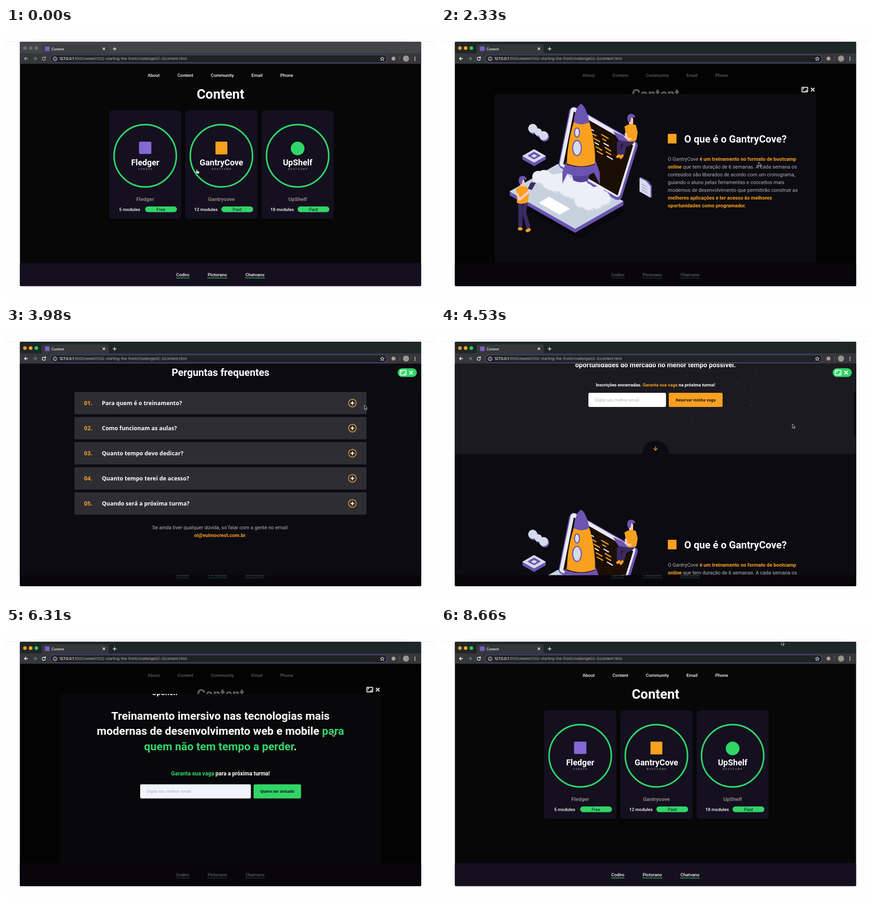
An HTML page that plays this animation: 940 by 596 pixels, repeating every 9660 ms.

```html
<!DOCTYPE html>
<html lang="pt-BR">
<head>
<meta charset="utf-8">
<title>Content</title>
<style>
  html, body { margin: 0; width: 100%; height: 100%; overflow: hidden; background: #fefefe; }
  svg { display: block; }
  text { font-family: Roboto, sans-serif; font-weight: 700; fill: #fff; white-space: pre; }
  .ui { font-family: Inter, sans-serif; font-weight: 500; }
  .noto { font-family: "Noto Sans", sans-serif; }
  .mid { text-anchor: middle; }
  .bold { font-weight: 700; }
  .med { font-weight: 500; }
  .reg { font-weight: 400; }
  .dim { fill: #8d8882; }
  .soft { fill: #b3b2bc; }
  .hint { fill: #a5adbb; font-weight: 400; }
  .dark { fill: #15101f; }
  .orange { fill: #f9a01f; }
  .green { fill: #33d56b; }
  .line { fill: none; stroke: #fff; }
</style>
</head>
<body>
<svg id="stage" width="940" height="596" viewBox="0 0 940 596"></svg>
<script>
const LOOP = 9660;
const ORANGE = '#f9a01f', GREEN = '#30d567', VIOLET = '#6c54b2', PALE = '#d5dbea', NAVY = '#3b2b63', SKIN = '#f6cdbd';

const text = (x, y, size, content, cls = '') =>
  `<text x="${x}" y="${y}" font-size="${size}" class="${cls}">${content}</text>`;
const span = (content, cls) => `<tspan class="${cls}">${content}</tspan>`;
const rect = (x, y, w, h, fill, r = 0) =>
  `<rect x="${x}" y="${y}" width="${w}" height="${h}" rx="${r}" fill="${fill}"/>`;
const circle = (x, y, r, fill) => `<circle cx="${x}" cy="${y}" r="${r}" fill="${fill}"/>`;
const shape = (d, fill) => `<path d="${d}" fill="${fill}"/>`;
const stroke = (d, color, width) =>
  `<path d="${d}" fill="none" stroke="${color}" stroke-width="${width}" stroke-linecap="round" stroke-linejoin="round"/>`;
const repeat = (n, make) => Array.from({ length: n }, (_, i) => make(i)).join('');

let seed = 7;
const random = (min, max) => min + (max - min) * ((seed = seed * 16807 % 2147483647) / 2147483647);

// Browser window

const chrome = `
  <path d="M0 29.5H30M910 29.5H940" stroke="#ececf8"/>
  ${rect(60, 24, 820, 6, '#f8f8fc', 3)}
  ${rect(30.5, 30, 879, 535.5, '#070708', 2)}
  <rect id="titleBar" x="30.5" y="30" width="879" height="26" rx="2"/>
  <path id="tab" d="M78 56V40Q78 36 82 36H221Q225 36 225 40V56Z"/>
  <g id="lights">${repeat(3, i => circle(41.5 + i * 12.5, 44, 4))}</g>
  ${rect(85.5, 40.5, 10, 10, '#7a5fc8', 1)}
  ${text(100, 48.5, 7.1, 'Content', 'ui')}
  <path d="M212 43l5 5m0-5l-5 5M234 45.7h8m-4-4v8" class="line" stroke-width="1.3"/>
  ${rect(30.5, 55.5, 879, 23, '#36373b')}
  <rect x="97" y="59" width="738" height="17" rx="8.5" fill="#202124" stroke="#574d9e" stroke-width="1.2"/>
  <path id="back" d="M48 67h-7.5m3.5-3.5L40.5 67l3.5 3.5M85.8 65a3.6 3.6 0 1 0 .6 3M86.5 62.5v3h-3" class="line" stroke-width="1.3"/>
  ${stroke('M59.5 67H67m-3.5-3.5L67 67l-3.5 3.5', '#8a8b8e', 1.2)}
  <circle cx="107.5" cy="67.5" r="4" class="line" stroke-width="1.1"/>
  <path d="M107.5 67v2.5M107.5 65v1" class="line" stroke-width="1.1"/>
  ${text(117, 70.3, 8.15, '127.0.0.1<tspan fill="#b4b6ba" class="reg">:5500/week01/02-starting-the-front/challenge02-3/content.html</tspan>', 'ui')}
  <path d="M824.5 63l1.2 3 3.2.2-2.5 2 .9 3.1-2.8-1.8-2.8 1.8.9-3.1-2.5-2 3.2-.2Z" class="line"/>
  ${circle(849, 67, 4.3, '#b39c94')}
  <path d="M862.5 61.5v11" stroke="#5c5d61"/>
  ${circle(876.5, 67, 6.7, '#9b948d')}
  ${repeat(3, i => circle(896, 64 + i * 3.3, 1.1, '#fff'))}`;

// Site below the modal

const card = (x, name, label, sub, modules, price, mark) => `<g transform="translate(${x})">
  ${rect(-79, 181, 158, 237, '#14101f', 6)}
  <circle cy="280" r="68.2" fill="none" stroke="${GREEN}" stroke-width="3.4"/>
  ${mark}
  ${text(0, 301, 18.2, name, 'mid')}
  <text x="1" y="310.5" font-size="5" letter-spacing="2.1" class="mid dim">${sub}</text>
  ${text(0, 379, 11.44, label, 'mid dim')}
  ${text(-34, 401, 9.8, modules + ' modules', 'mid med')}
  ${rect(0, 391, 69.5, 12.5, GREEN, 6.2)}
  ${text(34.5, 401, 9.8, price, 'mid reg dark')}</g>`;

const navItem = (x, name) => text(x, 106.5, 9.8, name, 'mid med');
const link = (x, w, name) => text(x, 543.7, 9.8, name, 'mid med') + rect(x - w / 2, 547, w, 1.3, '#30c460');

const site = `
  ${navItem(323.5, 'About')}${navItem(393, 'Content')}${navItem(474, 'Community')}
  ${navItem(550, 'Email')}${navItem(615, 'Phone')}
  ${text(470, 154.5, 29.3, 'Content', 'mid')}
  ${card(305, 'Fledger', 'Fledger', 'CURSOS', 5, 'Free', rect(-13.5, 249, 27, 27, '#8468d4', 2))}
  ${card(472, 'GantryCove', 'Gantrycove', 'BOOTCAMP', 12, 'Paid', rect(-13, 249, 26, 28, ORANGE))}
  ${card(639, 'UpShelf', 'UpShelf', 'BOOTCAMP', 18, 'Paid', circle(0, 264, 15, GREEN))}
  ${rect(30.5, 515, 879, 50.5, '#15101f', 2)}
  ${link(387.5, 29, 'Codiro')}${link(463, 44, 'Pictorano')}${link(545.5, 43, 'Chatvano')}`;

// Illustration: a rocket leaving a laptop

// Isometric block whose front corner is at (x, y).
function slab(x, y, w, d, h, top, side) {
  const slope = .57;
  const face = `M${x} ${y}l${w} ${-w * slope} ${-d} ${-d * slope} ${-w} ${w * slope}Z`;
  const walls = `M${x} ${y}l${w} ${-w * slope}v${h}l${-w} ${w * slope} ${-d} ${-d * slope}v${-h}Z`;
  return (h ? shape(walls, side) + stroke(walls, side, 3) : '') + shape(face, top) + stroke(face, top, 2);
}

const smoke = (n, at, light, shade) =>
  repeat(n, i => { const [x, y, r] = at(i); return circle(x + 2, y + 3, r, shade); }) +
  repeat(n, i => { const [x, y, r] = at(i); return circle(x, y, r, light); });

// Head and shirt of a figure, facing right or left.
const bust = (x, y, facing) => `<g transform="translate(${x} ${y}) scale(${facing} 1)">
  ${rect(-4, -4, 9, 16, SKIN, 4)}
  ${shape('M-8 -1Q-8 -12 1 -12 10 -11 9 -4H1L-1 6H-6Z', VIOLET)}
  ${shape('M-14 16Q0 7 11 13L15 29 12 46Q0 52 -12 47L-11 32Z', ORANGE)}</g>`;

const screen = 'M291 183L421 257 387 367 268 298Z';

const art = `<g id="art">
  ${slab(300, 456, 100, 110, 4, '#08070c', '#08070c')}
  ${slab(294, 439, 104, 142, 8, '#c8d2df', VIOLET)}
  ${stroke(screen, VIOLET, 20)}${stroke('M291 181L419 255 386 363 267 297Z', '#e8e9f3', 14)}${shape(screen, '#1b0e05')}
  ${repeat(6, row => repeat(2, col => {
    const x = 329 + row * 2.5 + col * 22, y = 222 + row * 9.5 + col * 11, w = random(6, 17);
    return `<path d="M${x} ${y}l${w} ${w * .58}" stroke="${(row + col) % 3 ? ORANGE : '#e9e8f0'}" stroke-width="2.6"/>`;
  }))}
  ${smoke(12, i => [213 + i * 13, 326 + i * 4 - 4 * Math.sin(i * 2), 13 + 8 * Math.sin(i * Math.PI / 11)], '#eceef8', '#d6dbe9')}
  ${smoke(4, i => [306 + i * 17, 378 + 7 * Math.sin(i * 1.3), 14], '#eceef8', '#d6dbe9')}
  ${slab(260, 408, 21, 44, 0, '#fff')}
  ${shape('M283 304H331L322 334Q307 342 290 334Z', '#56429a')}
  ${shape('M291 206Q308 214 325 206C334 235 338 268 338 297Q307 309 276 297C276 268 282 235 291 206', ORANGE)}
  ${shape('M307 166C299 170 292 186 291 206Q307 216 325 206C322 188 315 170 307 166', VIOLET)}
  ${shape('M276 289L266 315V341L277 319Q307 331 335 317L348 343V317L337 287V299Q307 310 275 299Z', VIOLET)}
  <g fill="${PALE}" stroke="#7058b4" stroke-width="2.4"><ellipse cx="298" cy="229" rx="5.5" ry="10"/><ellipse cx="298" cy="263" rx="9.5" ry="16.5"/></g>
  ${smoke(3, i => [201 + i * 12, 220 + i * 8, 10 - 2 * (i % 2)], PALE, VIOLET)}
  ${slab(204, 294, 24, 24, 7, PALE, VIOLET)}${slab(204, 287, 13, 13, 0, VIOLET)}${slab(204, 283, 5, 5, 0, PALE)}
  ${shape('M437 326L455 336 462 346V372L437 360Z', VIOLET)}${shape('M435 328L449 335 459 347V372L435 358Z', PALE)}
  ${repeat(3, i => `<path d="M440 ${342 + i * 6}l12 7" stroke="#8b7cc0"/>`)}
  ${stroke('M412 248L390 252V275M418 250L402 258 397 277', NAVY, 9)}
  ${stroke('M390 280l-3 2M397 280l-3 4', ORANGE, 6)}
  ${bust(416, 200, 1)}
  ${stroke('M405 232L407 243H415', SKIN, 5)}${shape('M377 226L399 236 411 249 389 246Z', VIOLET)}
  ${stroke('M174 384V432M185 384L182 404 191 435', NAVY, 9)}
  ${stroke('M175 440h-3M193 442l-4 2', ORANGE, 7)}
  ${bust(178, 336, 1)}
  ${stroke('M167 364L172 376 192 359', SKIN, 5)}${shape('M197 338L208 339 199 355 190 352Z', NAVY)}
</g>`;

// Pages shown in the modal

const field = (x, y, w, label, labelWidth, color, fill = '#fff') => `
  ${rect(x, y, w, 31, fill, 3)}${text(x + 14, y + 18.7, 8.7, 'Digite seu melhor email', 'noto hint')}
  ${rect(x + w + 6, y, labelWidth, 31, color, 3)}
  ${text(x + w + 6 + labelWidth / 2, y + 18.7, 8.3, label, 'noto mid dark')}`;

const intro = [
  'O GantryCove ' + span('é um treinamento no formato de bootcamp', 'orange bold'),
  span('online', 'orange bold') + ' que tem duração de 6 semanas. A cada semana os',
  'conteúdos são liberados de acordo com um cronograma,',
  'guiando o aluno pelas ferramentas e conceitos mais',
  'modernos de desenvolvimento que permitirão construir as',
  span('melhores aplicações e ter acesso às melhores', 'orange bold'),
  span('oportunidades como programador.', 'orange bold')];

const questions = ['Para quem é o treinamento?', 'Como funcionam as aulas?', 'Quanto tempo devo dedicar?',
  'Quanto tempo terei de acesso?', 'Quando será a próxima turma?'];

const faq = questions.map((question, i) => `<g transform="translate(0 ${680 + i * 55})">
  ${rect(150, 0, 640, 49, '#2d2d33', 2)}
  ${text(171, 29.5, 12.6, `0${i + 1}.`, 'noto orange')}${text(210, 29.5, 12.4, question, 'noto')}
  <circle cx="759" cy="24.5" r="8.5" fill="none" stroke="${ORANGE}" stroke-width="1.5"/>
  <path d="M755 24.5h8m-4-4v8" class="line" stroke-width="2"/></g>`).join('');

// y = 0 is the lower edge of the hero.
const launchPage = `<g id="launch">
  ${rect(0, -380, 940, 1800, '#0c0b11')}${rect(0, -380, 940, 380, '#1b1a20')}
  ${repeat(28, () => circle(random(210, 720), random(-340, -50), .8, '#76615a'))}
  ${rect(380, -325, 28, 30, ORANGE)}${text(418, -302, 22, 'GantryCove')}
  ${text(470, -234, 14.66, 'Aprenda as ferramentas mais modernas', 'mid')}
  ${text(470, -212, 14.66, 'de desenvolvimento web e conquiste as melhores', 'mid')}
  ${text(470, -190, 14.66, 'oportunidades do mercado no menor tempo possível.', 'mid')}
  ${text(470, -148, 9.8, `Inscrições encerradas. ${span('Garanta sua vaga', 'orange')} na próxima turma!`, 'mid')}
  ${field(323, -134, 170, 'Reservar minha vaga', 118, ORANGE)}
  ${shape('M441 0A29.5 29.5 0 0 1 500 0Z', '#0d0c12')}
  ${stroke('M470 -16v8m-4-4l4 4 4-4', ORANGE, 1.5)}
  <g transform="translate(0 -44)">${art}
    ${rect(497, 232, 19, 21, ORANGE)}${text(533, 250.5, 22, 'O que é o GantryCove?')}
    ${intro.map((line, i) => text(497, 290.5 + i * 17.1, 11, line, 'reg soft')).join('')}
  </g>
  ${text(470, 645, 22, 'Perguntas frequentes', 'mid')}${faq}
  ${text(470, 981, 11, 'Se ainda tiver qualquer dúvida, só falar com a gente no email:', 'mid reg soft')}
  ${text(470, 998.5, 11, span('oi@vulmocrest.com.br', 'orange bold') + '.', 'mid reg soft')}
  ${rect(0, 1124, 940, 296, '#1f1e27')}
  <use href="#art" transform="translate(25.2 999.5) scale(.69)"/>
  ${text(368, 1173, 22, 'Garanta sua vaga', 'orange')}${text(368, 1201, 22, 'para a próxima turma!')}
  ${field(368, 1232, 169, 'Reservar minha vaga', 118, ORANGE)}
</g>`;

const stackPage = `<g id="stack">
  ${circle(305, 138, 6, GREEN)}${text(348, 147, 16, 'UpShelf', 'mid')}
  ${text(470, 200.7, 24.4, 'Treinamento imersivo nas tecnologias mais', 'mid')}
  ${text(470, 234.3, 24.4, 'modernas de desenvolvimento web e mobile ' + span('para', 'green'), 'mid')}
  ${text(470, 268, 24.4, span('quem não tem tempo a perder', 'green') + '.', 'mid')}
  ${text(470, 323, 12.1, span('Garanta sua vaga', 'green') + ' para a próxima turma!', 'mid')}
  ${field(294, 342.5, 242.5, 'Quero ser avisado', 104, GREEN, '#f3f3fe')}
</g>`;

document.getElementById('stage').innerHTML = `${chrome}${site}
  <g id="overlay">
    ${rect(30.5, 78.5, 879, 487, 'rgba(0,0,0,.63)')}
    <svg id="modal"><rect id="paper" width="940" height="596"/>${launchPage}${stackPage}
      <g id="scrollbar">${rect(905, 139, 4, 98, '#08080a', 2)}</g></svg>
    <g id="tools">
      <g id="pill">${rect(785, 125.5, 42, 19, GREEN, 9.5)}</g>
      <g id="expand" fill="none" stroke-width="1.8"><rect x="790.8" y="129.8" width="12.6" height="10.2" rx="1"/>
        <path d="M793.5 135v-2.5h2.5M800.8 135v2.5h-2.5" stroke-width="1.3"/></g>
      <path d="M810.7 131.2l7.6 7.6m0-7.6l-7.6 7.6" class="line" stroke-width="2"/>
    </g>
  </g>
  <g id="cursor">
    <path id="arrow" d="M0 0V9.2L2.1 7.3 3.5 10.6 5.1 9.9 3.7 6.7H6.5Z" fill="#000" stroke="#fff" stroke-width=".8"/>
    <path id="hand" d="M-1 1Q0-.5 1 1V4.5L5 5.3Q6 5.6 5.7 7L5 10H.5L-2.5 6.5Q-2.5 5-1 5.8Z" fill="#fff" stroke="#111" stroke-width=".7"/>
  </g>`;

// Motion

const el = id => document.getElementById(id);
const show = (id, on) => el(id).style.display = on ? '' : 'none';
const set = (id, attrs) => { for (const key in attrs) el(id).setAttribute(key, attrs[key]); };
const move = (from, until, ...to) => ({ from, until, to });

// Eases from one resting place to the next.
const glide = (start, moves, t) => moves.reduce((place, { from, until, to }) => {
  const p = Math.min(1, Math.max(0, (t - from) / (until - from)));
  const eased = p * p * (3 - 2 * p);
  return place.map((v, i) => v + (to[i] - v) * eased);
}, start);

const LAUNCH_CARD = [418, 309], STACK_CARD = [640, 300], EXPAND = [798, 136], CLOSE = [887, 97];
const pointer = [
  move(550, 920, 476, 287), move(1360, 1445, 502, 301), move(1800, 2310, 696, 294),
  move(3180, 3440, ...EXPAND), move(3560, 4500, 770, 210), move(4700, 5060, ...CLOSE),
  move(5200, 5500, ...STACK_CARD), move(5700, 6130, 715, 228), move(6800, 7050, ...EXPAND),
  move(7200, 7800, ...CLOSE), move(7950, 8650, 746, 28)];
const launchScroll = [move(1890, 2310, 44), move(2420, 3400, -730), move(3800, 4510, 276), move(4560, 4900, 458)];
const stackScroll = [move(5860, 6060, 0), move(6340, 6760, -110), move(7250, 7600, 34)];

function draw(t) {
  const step = t < 3170 ? 87 : 89.7;
  const q = 3190 + step * Math.floor((t - 3170) / step);

  const active = t >= 110;
  set('titleBar', { fill: active ? '#1f2628' : '#434448' });
  set('tab', { fill: active ? '#36373b' : '#3d3e42' });
  set('back', { opacity: active ? 1 : .6 });
  ['#f2932c', '#f5a623', '#2fca55'].forEach((color, i) =>
    el('lights').children[i].setAttribute('fill', active ? color : '#6b6c70'));

  const between = (from, until) => t >= from && t < until;
  const inLaunch = between(1150, 5150), inStack = between(5600, 7950);
  const loading = between(1150, 1800) || between(5600, 5780);
  const large = between(3540, 5150) || between(7150, 7950);
  show('overlay', inLaunch || inStack);
  show('launch', inLaunch && !loading);
  show('stack', inStack && !loading);
  show('scrollbar', inLaunch && large);
  show('pill', large);

  const [x, y, width, height] = large ? [30.5, 78.5, 879, 463] : [118, 144.5, 704, 370];
  set('modal', { x, y, width, height, viewBox: `${x} ${y} ${width} ${height}` });
  set('paper', { fill: loading ? '#fff' : '#08080a' });
  set('launch', { transform: `translate(0 ${glide([524], launchScroll, q)})` });
  set('stack', { transform: `translate(0 ${glide([100], stackScroll, q)})` });
  set('tools', { transform: large ? 'translate(73.2 -37.2)' : '' });

  const place = glide(LAUNCH_CARD, pointer, q);
  const over = ([targetX, targetY]) => Math.hypot(place[0] - targetX, place[1] - targetY) < 8;
  const overExpand = (inLaunch || inStack) && !large && over(EXPAND);
  const hand = t < 1150 || overExpand || large && over(CLOSE) || !inStack && over(STACK_CARD);
  set('expand', { stroke: overExpand ? '#7159c1' : '#fff' });
  show('hand', hand);
  show('arrow', !hand);
  set('cursor', { transform: `translate(${place})` });
}

function frame() {
  draw(performance.now() % LOOP);
  requestAnimationFrame(frame);
}
frame();
</script>
</body>
</html>
```
